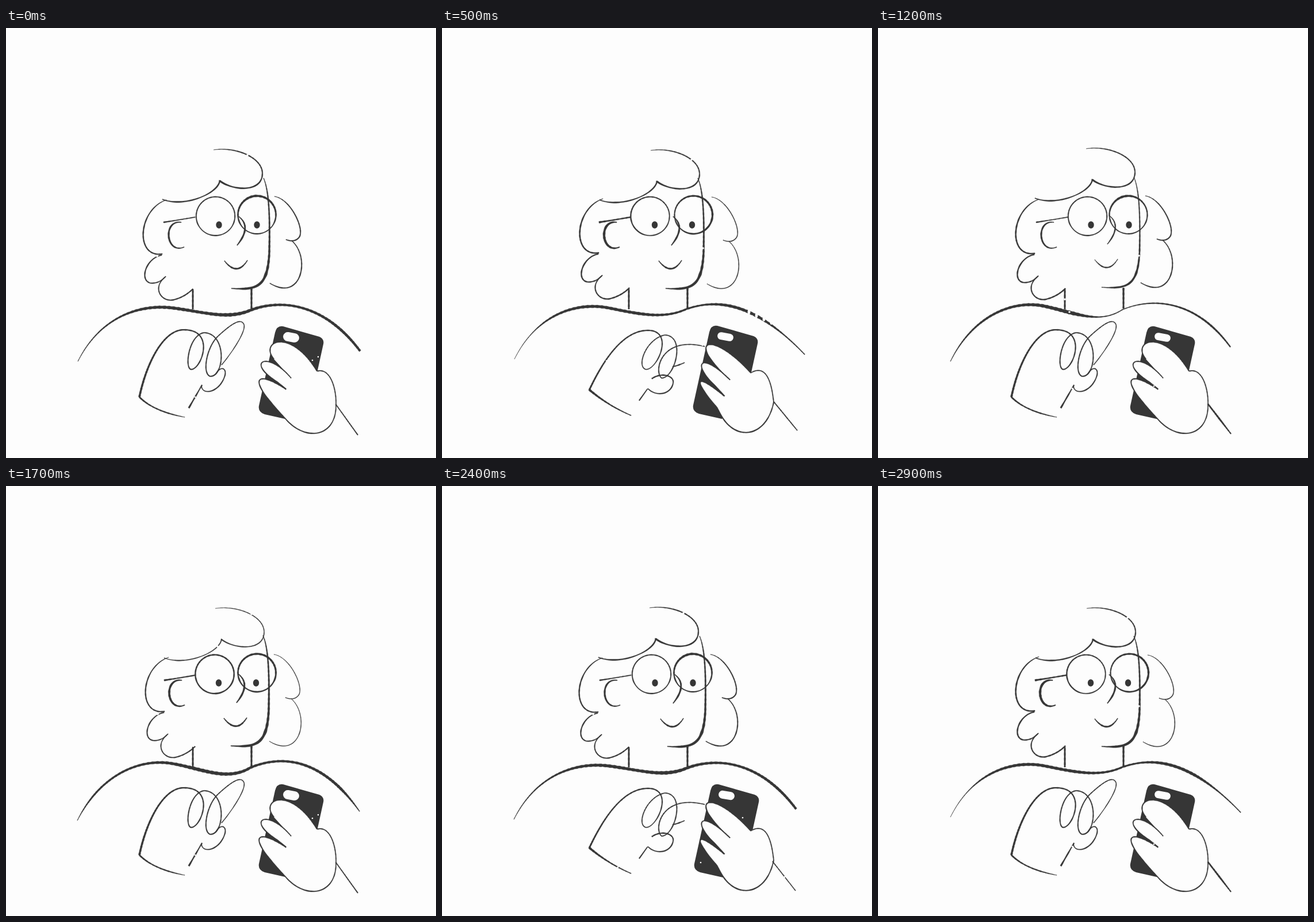
An HTML page that plays this animation: 748 by 748 pixels, repeating every 3000 ms.

```html
<!DOCTYPE html>
<html lang="en">
<head>
<meta charset="utf-8">
<title>Tapping</title>
<style>
  html, body { margin: 0; width: 100%; height: 100%; overflow: hidden; background: #fdfdfd; }
  svg { display: block; width: 100%; height: 100%; }
  .pose { visibility: hidden; }
</style>
</head>
<body>
<svg id="stage" viewBox="0 0 748 748"></svg>
<script>
const INK = '#363636', PAPER = '#fdfdfd';
const stage = document.getElementById('stage');

function add(parent, tag, attrs) {
  const el = document.createElementNS(stage.namespaceURI, tag);
  for (const key in attrs) el.setAttribute(key, attrs[key]);
  return parent.appendChild(el);
}
const group = (parent, dx = 0, dy = 0) => add(parent, 'g', { transform: `translate(${dx} ${dy})` });
const dot = (parent, cx, cy, rx, ry = rx, fill = PAPER) => add(parent, 'ellipse', { cx, cy, rx, ry, fill });

// Inks a path with a line whose widths are spread evenly along it
function brush(parent, d, weight, scale = 1) {
  const path = add(parent, 'path', { d, fill: INK, stroke: INK, 'stroke-width': .4, 'stroke-linejoin': 'round' });
  const widths = weight.split(' ').map(Number), total = path.getTotalLength();
  const count = Math.ceil(total / 2.5), left = [], right = [];
  const at = i => path.getPointAtLength(Math.max(0, Math.min(1, i / count)) * total);
  for (let i = 0; i <= count; i++) {
    const c = at(i), p = at(i - 1), q = at(i + 1);
    const dx = q.x - p.x, dy = q.y - p.y, len = Math.hypot(dx, dy) || 1;
    const pos = i / count * (widths.length - 1), n = Math.floor(pos);
    const w = widths[n] + ((widths[n + 1] ?? widths[n]) - widths[n]) * (pos - n);
    const h = (w * scale * (1 + .12 * Math.sin(i * 1.9 + c.x)) - .4) / 2 / len;
    left.push([c.x - dy * h, c.y + dx * h]);
    right.unshift([c.x + dy * h, c.y - dx * h]);
  }
  const outline = [...left, ...right].map(p => p.map(n => n.toFixed(1)).join(' '));
  path.setAttribute('d', `M${outline.join('L')}Z`);
}

// Starts at the left and runs over the top
const ring = (x, y, r) => `M${x - r} ${y}a${r} ${r} 0 1 1 0 .1`;

// Each part takes [dx, dy, line weight]
function makeHead({ hair, curls, back, face, ear, lenses, pupils, rims, shoulder, weight, gaps }) {
  const head = add(stage, 'g', { class: 'pose' });
  const part = ([dx, dy, scale], lines) => {
    const g = group(head, dx, dy);
    for (const d in lines) brush(g, d, lines[d], scale);
  };
  part(hair, {
    'M362 212C400 206 447 225 447 253C447 287 395 283 373 266': '.7 1.8 2.1 2 2.4 2.4 2.8',
    'M373 265C371 288 311 313 273 298': '2.8 2 2 2.6 1.5'
  });
  part(curls, {
    'M280 298C230 315 225 400 273 392': '1 2 2.4 2.3 2.2',
    'M272 394C240 400 230 450 262 442Q271 440 279 431': '1.8 2.2 2.2 1.5',
    'M278 432C255 450 270 476 292 472Q312 467 326 453': '1.6 2 2.2 2.2'
  });
  part(back, {
    'M467 293C495 297 520 350 510 364Q502 374 487 368': '1 2 2 2 2',
    'M497 370C530 398 515 478 459 444': '1.5 2 2.2 1.7'
  });
  part(face, {
    'M446 260C457 285 457 340 456 390C453 450 435 455 390 452': '1.2 2.4 2.6 3 3.6 4.8 4.4 1.5',
    'M403 327Q426 345 400 377': '1.6 2.8 3.2 1.8',
    'M378 404Q400 432 418 403': '1.4 2.8 2.8 1.4'
  });
  part(ear, {
    'M274 338Q300 334 329 329': '2.6 1.8 1.8 1.9',
    'M305 338C272 333 278 395 310 381': '1.4 2.8 3.2 2.8 1.3'
  });
  part([0, 0, 1], {
    'M325 454V489': '2.8 3',
    'M427 452V488': '3.4 3',
    [shoulder]: weight
  });
  for (const [x, y] of gaps) dot(head, x, y, 1.8);
  lenses.forEach((x, i) => {
    brush(head, i ? ring(x, 325, 33) : ring(x, 327.3, 33.7), rims[i]);
    dot(head, pupils[i], 342.5, 5.2, 6.2, INK);
  });
  return head;
}

const heads = {
  A: makeHead({
    hair: [-1, 0, 1.05], curls: [-1, 1, 1], back: [0, 0, 1], face: [2, 1, 1], ear: [0, 0, 1],
    lenses: [364.5, 436.5], pupils: [370.5, 436.5], rims: ['2', '2.6 4 3.4 2 2 2.6'],
    shoulder: 'M125 580C165 500 235 480 290 487S385 508 425 491C480 470 555 480 616 562',
    weight: '1 2 3 4.6 5.4 5 6 4.6 4 4.4 4.8 4', gaps: [[420, 221], [263, 397], [251, 441]]
  }),
  B: makeHead({
    hair: [1, 1, 1], curls: [0, -1, 1.1], back: [2, 1, .75], face: [-1, 1, 1], ear: [-1, 0, 1.35],
    lenses: [362, 437.5], pupils: [370, 435], rims: ['2.4 2 1.8 2.4', '2 2.8 3.4 3.4 2.4 2'],
    shoulder: 'M126 576C165 497 235 476 290 487S385 507 425 489C480 470 545 478 631 568',
    weight: '.6 1.4 3.6 5 5 5 3.6 3 5 5 2.4 1.6', gaps: [[411, 214], [434, 229], [454, 383]]
  }),
  C: makeHead({
    hair: [0, -2, 1], curls: [0, 0, 1.1], back: [-2, -1, 1], face: [-1, -1, .8], ear: [1, 0, .95],
    lenses: [364.5, 435.5], pupils: [370.5, 436.5], rims: ['2', '2.2 4 2.4 2 2 2.2'],
    shoulder: 'M126 580C165 500 235 472 290 484S385 516 425 490C480 467 555 475 613 555',
    weight: '1 2.6 3.8 4.4 5.6 6.4 1.8 1.6 2.4 3 3.4 2.4', gaps: [[454, 396], [325, 472], [333, 494], [345, 296]]
  }),
  D: makeHead({
    hair: [2, 1, .75], curls: [3, 0, .95], back: [-1, 0, .65], face: [1, 0, 1.05], ear: [1, 0, 1.2],
    lenses: [363, 436.5], pupils: [370, 435], rims: ['2.5', '2.6 3.4 3.4 2.6 2.4 2.6'],
    shoulder: 'M124 582C165 500 235 473 290 483S385 514 425 490C480 467 550 473 615 566',
    weight: '1 3.2 3.5 4 5 6 5.6 4 4 4.6 4.8 1.4', gaps: [[427, 223], [368, 279], [264, 397]]
  })
};

const raised = {
  lines: {
    'M232 642C245 580 275 524 310 525C365 525 340 594 322 594C310 592 318 533 345 530C385 532 380 607 355 606C340 600 350 552 370 535C395 512 408 506 413 514C422 525 385 575 375 586': '3.6 3 2.3 2 2 2 2 1.6 1.4',
    'M365 602C372 588 384 590 381 604C372 635 340 640 340 622': '1.6 2 2 1.7',
    'M232 642Q257 667 311 677': '3 2.2 2.4 1',
    'M341 621L318 661': '2 2.4 2.9'
  },
  grip: 'M466 576C440 545 495 520 541 597C565 590 575 630 574 655C575 710 525 720 490 684L470 662C415 600 445 600 488 629L472 616C415 580 455 560 496 609'
};
const tapping = {
  lines: {
    'M256 630C275 590 310 526 358 526C405 526 375 594 355 594C337 590 355 540 388 534C425 536 405 609 382 609C368 598 380 535 457 554': '3 2.4 2.3 1.8 1.8 2 2 1.6',
    'M256 629Q289 657 329 674': '4 2.4 1.6',
    'M365 610C382 598 405 605 402 618C398 638 372 642 358 627L343 648': '2.4 2.1 2 2',
    'M401 589Q409 588 422 582': '1.4 2.4 1.4'
  },
  grip: 'M501 612C420 540 470 525 537 600C570 580 575 635 577 651C565 710 515 720 488 678L478 660C435 610 440 598 492 641L474 621C435 585 448 560 501 612'
};
const PHONE = 'M482 519L545 537Q554 541 552 550L541 600L490 681L450 672Q438 668 440 657L468 530Q471 517 482 519Z';

function makeHands({ lines, grip }, { shift, lensHeight, arm, armWeight, gaps }) {
  const g = add(stage, 'g', { class: 'pose' });
  for (const d in lines) brush(g, d, lines[d]);
  const phone = group(g, ...shift);
  add(phone, 'path', { d: PHONE, fill: INK });
  add(phone, 'rect', {
    x: 482, y: 538 - lensHeight / 2, width: 28, height: lensHeight, rx: lensHeight / 2,
    fill: PAPER, transform: 'rotate(10 496 538)'
  });
  add(g, 'path', { d: grip + 'Z', fill: PAPER });
  brush(g, grip, '2 2.2 1.8 1.8 2.2 2 2.1 2 1.8');
  brush(g, arm, armWeight);
  for (const [x, y] of gaps) dot(g, x, y, 1.3);
  return g;
}

const hands = {
  up1: makeHands(raised, {
    shift: [0, 0], lensHeight: 16, arm: 'M574 655L612 708', armWeight: '1.8 2',
    gaps: [[533, 578], [543, 572], [329, 642], [569, 640]]
  }),
  up2: makeHands(raised, {
    shift: [-1, 0], lensHeight: 13, arm: 'M574 654L614 706', armWeight: '2.6 3.2 2',
    gaps: [[277, 671], [289, 674], [338, 627], [480, 623]]
  }),
  tap1: makeHands(tapping, {
    shift: [-3, -1], lensHeight: 13, arm: 'M577 650L618 700', armWeight: '2 1.8',
    gaps: [[286, 579], [453, 552], [520, 706]]
  }),
  tap2: makeHands(tapping, {
    shift: [-1, 0], lensHeight: 14, arm: 'M575 653L615 704', armWeight: '1.8 1.6',
    gaps: [[523, 577], [450, 655], [306, 663], [596, 680]]
  })
};

// Worn patches on the shoulder line
const cracks = add(stage, 'g', { class: 'pose' });
for (let i = 0; i < 4; i++) dot(cracks, 534 + 13 * i, 494 + 6 * i, 2.4, 4);

// Start of each burst in ms; its poses change every 100 ms and the last one holds
const bursts = [
  [0, 'A up1'],
  [500, 'B tap1 worn', 'B up2', 'A tap2', 'B up2'],
  [1000, 'C tap1', 'B tap1', 'C up2'],
  [1500, 'D tap2', 'C tap1', 'D up1'],
  [2000, 'A tap2 worn', 'B up2', 'A tap2', 'B up2', 'A tap2', 'B up2']
];
const show = (el, on) => { el.style.visibility = on ? 'visible' : 'hidden'; };

function draw() {
  const time = performance.now() % 3000;
  const [start, ...poses] = bursts.findLast(burst => burst[0] <= time);
  const pose = poses[Math.min(poses.length - 1, Math.floor((time - start) / 100))];
  const [head, hand, worn] = pose.split(' ');
  for (const name in heads) show(heads[name], name === head);
  for (const name in hands) show(hands[name], name === hand);
  show(cracks, worn);
  requestAnimationFrame(draw);
}
draw();
</script>
</body>
</html>
```
